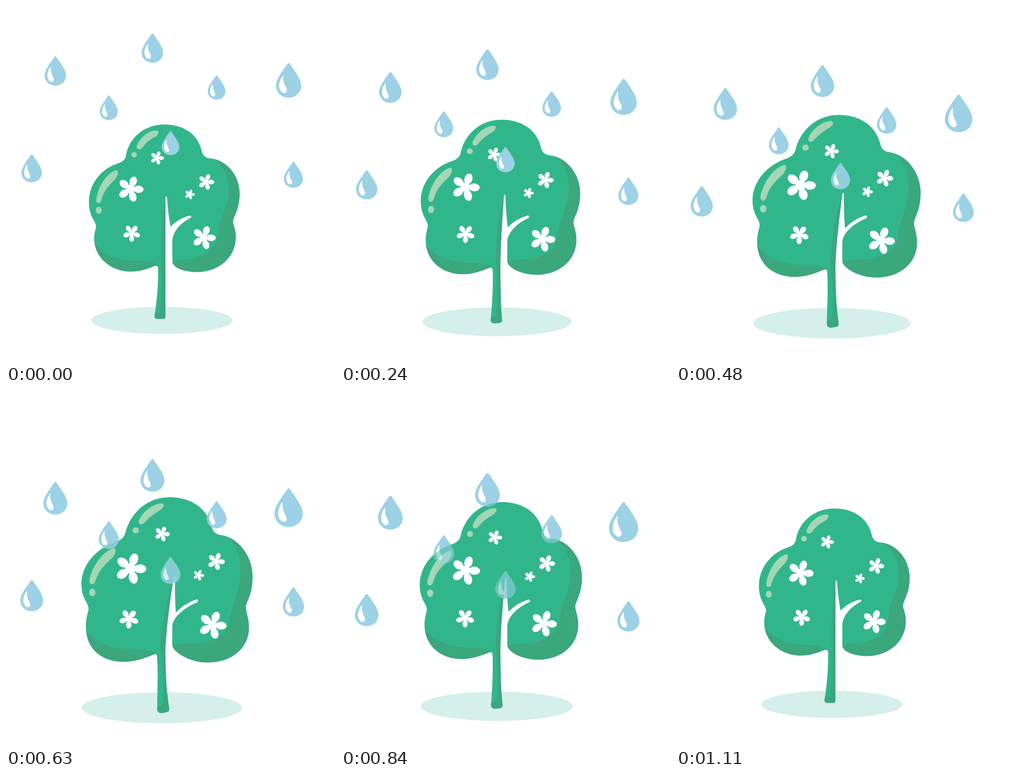
An HTML page with a canvas for the animation above (1200 ms loop, 720x778 px).

```html
<!DOCTYPE html>
<html lang="en">
<head>
<meta charset="utf-8">
<title>Tree in the rain</title>
<style>
html, body { margin: 0; height: 100%; overflow: hidden; background: #fff; }
canvas { display: block; }
</style>
</head>
<body>
<canvas id="stage" width="720" height="778"></canvas>
<script>
const ctx = document.getElementById('stage').getContext('2d');
const GREEN = '#31b68c', SHADE = '#3ba77c', SHINE = '#a3d6b3', WATER = '#9dd1e6', GROUND = '#d5efeb';

// Each shape is a pair: at rest, and swollen (reached after 480 ms).
const crown = [
  `M364 540 L364 558 C364 572 390 581.5 418 581.5 C465 581.5 503 550 503 505
   C503 485 496 477 497 470 C497 462 511.5 445 511.5 410 C511.5 370 482 335 446 333
   C436 332 431 326 429 319 C421 281 390 259 346 259 C301 259 268 290 262 329
   C260 337 254 341 245 344 C207 356 181.5 390 181.5 428 C181.5 463 198 470 197 483
   C196 489 193 496 193 508 C193 550 230 580.5 273 580.5 C301 580.5 320 569 327 568
   C331 567 333 570 333 575 L340 575 L340 540 Z`,
  `M363.5 540 L363.5 556 C363.5 572 400 593.5 438 593.5 C490 593.5 527.5 562 527.5 517
   C527.5 495 520 483 521 473 C521 463 535.5 448 535.5 408 C535.5 362 502 323 466 319.5
   C456 318 450 312 448 305 C439 263 404 238 356 238 C308 238 271 272 261 316
   C258 324 253 329 243 333 C198 347 167.5 385 167.5 424 C167.5 460 185 465 183 482
   C181 489 177.5 500 177.5 516 C177.5 565 214 592 260 592 C288 592 312 581 325 576
   C329 575 331 577 331 583 L340 583 L340 540 Z`];
const shades = [
  [`M448 330 C480 348 490 385 487 412 C484 445 467 462 465 492 C463 535 430 551 395 553
    C378 554 366 556 362 566 L400 600 L540 600 L540 330 Z`,
   `M470 316 C504 335 513 375 508 412 C505 445 489 470 486 500 C484 540 445 553 400 554
    C380 554 367 555 361 565 L400 610 L560 610 L560 316 Z`],
  ['M190 513 C212 545 245 556 285 557 C310 557 326 557 334 572 L334 600 L180 600 Z',
   'M174 520 C200 553 235 565 280 566 C305 566 322 565 333 580 L334 610 L165 610 Z']];
const shines = [
  ['M327 272 C310 273 292 290 286 306 C285 314 292 316 298 310 C307 297 315 292 328 285 C336 278 336 271 327 272 Z',
   'M337 251.5 C318 253 298 270 290 288 C288 297 295 299 301 294 C312 281 321 275 337 265 C346 258 346 250.5 337 251.5 Z'],
  ['M241 359 C220 365 201 395 197.5 424 C198 432 204 433 208 427 C214 405 222 395 240 377 C246 369 247 358 241 359 Z',
   'M236 347.5 C212 355 190 388 184.5 417 C185 427 192 428 197 421 C203 399 212 388 235 367 C242 358 243 346 236 347.5 Z']];
const dots = [ // x, y, rx, ry
  [[280.3, 325, 6.2, 6], [283.5, 309.5, 7, 6.7]],
  [[203, 446.3, 6.5, 7.6], [191, 443, 7, 8.3]]];
const branch = [
  `M349 419 Q351 413 352.5 419 C354 445 357 465 360 482 C372 470 386 462 402 458
   C406 458 406 462 404 463 C385 472 364 492 364 515 L364 575 L346 575 C346 540 349 480 349 419 Z`,
  `M364 412 Q365.5 404 367.5 412 C367 440 368 465 370 486 C382 473 396 464 414 458
   C419 457 419 462 416 464 C392 474 364 495 364 517 L363.5 575 L346 575 C348 540 356 460 364 412 Z`];
const trunk = [
  `M333 572 C333 610 331 640 325 677 Q325 684 331 684 L343 684 Q349 684 349 678
   C349 660 349 620 349 575 L336 548 Z`,
  `M331 580 C333 620 331 660 330 695 Q331 703 339 703 L349 701.5 Q357 700 356 694
   C351 660 349 620 349 580 L336 548 Z`];
const trunkShade = [
  `M349 417 C344 440 339.5 490 339.5 560 C341 610 340 650 336 668 Q333 671 326.5 670
   L325 677 Q325 684 331 684 L343 684 Q349 684 349 678 C349 660 349 620 349 575
   C349 530 349 460 349 418 Z`,
  `M364 410 C352 450 338.5 515 338 562 C343 610 345 650 342 684 Q339 688 330.5 688
   L330 695 Q331 703 339 703 L349 701.5 Q357 700 356 694 C351 660 349 620 349 580
   C349 530 358 460 364 411 Z`];
const ground = [[341.3, 687, 154.3, 29.8], [341.3, 693.3, 172.3, 33.3]];
const flowers = [ // x, y, radius, turn
  [[272.5, 400, 28.5, .03], [272.5, 391.5, 33.5, .03]],
  [[438, 384.5, 17.7, .03], [456.5, 376, 19, .06]],
  [[433, 506, 26, .03], [449, 512.5, 30, .06]],
  [[275, 496.5, 19, 1.57], [270, 499.5, 21, 1.6]],
  [[330.7, 332, 15, .03], [340, 317, 16.5, .06]],
  [[402, 411.7, 11, .03], [418.7, 405.7, 12, .06]]];

const drops = [ // x, y, size
  [108, 142, 1], [320.5, 92, 1], [225, 222.5, .84], [461, 178.2, .83],
  [618.5, 162.5, 1.18], [360, 299.8, .82], [56.3, 354.8, .95], [629, 368.8, .89]];
const glint = new Path2D('M-10.5-9 C-17-1 -20 13 -14 20 C-11 25 -3.5 25 -3.5 18.5 C-3.5 12 -11 8 -10-8 Q-10-10 -10.5-9 Z');
const drop = new Path2D('M-2-31 Q0-33 2-31 C9-20 23.5-3 23.5 9.5 C23.5 23 13 32 0 32 C-13 32 -23.5 23 -23.5 9.5 C-23.5-3 -9-20 -2-31 Z');
drop.addPath(glint);

const lerp = (a, b, k) => a + (b - a) * k;
const mix = ([a, b], k) => a.map((v, i) => lerp(v, b[i], k));

function morph([a, b], k) {
  const end = b.match(/[\d.]+/g);
  let i = 0;
  return new Path2D(a.replace(/[\d.]+/g, v => lerp(+v, +end[i++], k)));
}

function fill(path, color, mode = 'source-over') {
  ctx.globalCompositeOperation = mode;
  ctx.fillStyle = color;
  ctx.fill(path, 'evenodd');
}

function oval([x, y, rx, ry]) {
  const path = new Path2D();
  path.ellipse(x, y, rx, ry, 0, 0, 7);
  return path;
}

function cutFlower([x, y, r, turn]) {
  ctx.save();
  ctx.translate(x, y);
  ctx.rotate(turn);
  fill(oval([0, 0, r * .33, r * .33]), '#000', 'destination-out');
  for (let i = 0; i < 5; i++) {
    fill(oval([r * .61, 0, r * .39, r * .28]), '#000', 'destination-out');
    ctx.rotate(Math.PI * .4);
  }
  ctx.restore();
}

function drawTree(k) {
  fill(morph(crown, k), GREEN);
  shades.forEach(s => fill(morph(s, k), SHADE, 'source-atop'));
  shines.forEach(s => fill(morph(s, k), SHINE));
  dots.forEach(d => fill(oval(mix(d, k)), SHINE));
  fill(morph(branch, k), '#000', 'destination-out');
  flowers.forEach(f => cutFlower(mix(f, k)));
  fill(morph(trunk, k), GREEN);
  fill(morph(trunkShade, k), SHADE);
}

function drawDrops(t, mode) {
  for (const [x, y, size] of drops) {
    const s = size * (1 + t / 5400);
    ctx.save();
    ctx.translate(x, y + t * .15);
    ctx.scale(s, s);
    fill(glint, '#fff', mode);
    fill(drop, WATER, mode);
    ctx.restore();
  }
}

function draw(now) {
  const t = Math.floor(now % 1200 / 30) * 30;
  const k = t < 600 ? t / 480 : 1.25 * Math.max(0, 1110 - t) / 510;
  ctx.clearRect(0, 0, 720, 778);
  drawTree(k);
  // Drops fade over the tree, but stay solid on white until they vanish.
  const alpha = 1 - Math.min(1, t / 1110) ** 2.7;
  ctx.globalAlpha = alpha;
  drawDrops(t, 'source-atop');
  ctx.globalAlpha = 1;
  if (alpha > .5) drawDrops(t, 'destination-over');
  fill(oval(mix(ground, k)), GROUND, 'destination-over');
  requestAnimationFrame(draw);
}
draw(0);
</script>
</body>
</html>
```
